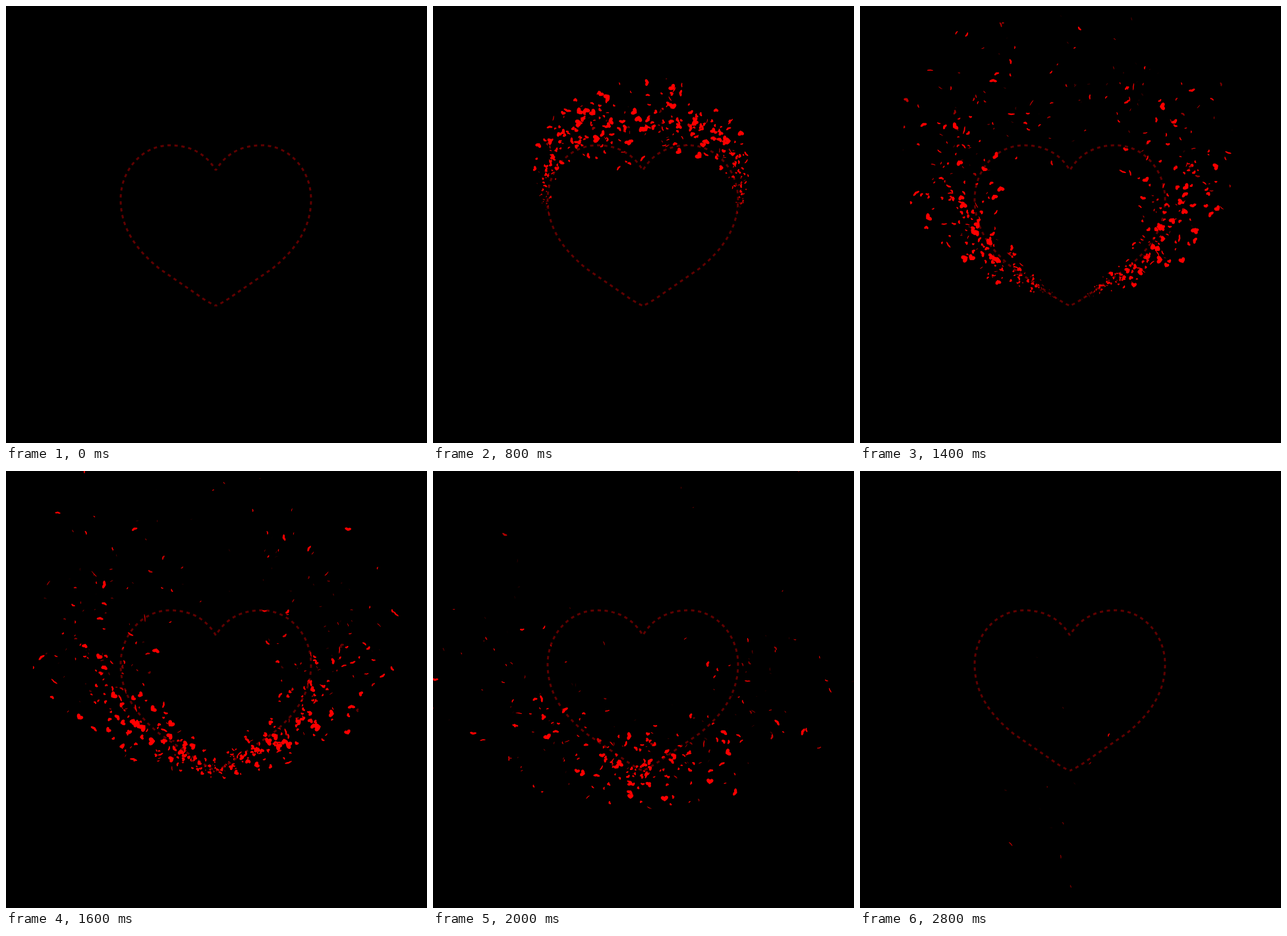
These frames come from a looping animation (639x662 px, 2900 ms). An HTML page with a canvas:

```html
<!DOCTYPE html>
<html lang="en">
<head>
<meta charset="utf-8">
<title>Heart petals</title>
<style>
  html, body { margin: 0; width: 100%; height: 100%; overflow: hidden; background: #000; }
  canvas { display: block; }
</style>
</head>
<body>
<canvas width="639" height="662"></canvas>
<script>
const ctx = document.querySelector('canvas').getContext('2d');
const LOOP = 2900, STEP = 100, EMIT = 1430, COUNT = 680, AXIS = 637;

// Left half of the outline, from the notch to the tip; the right half mirrors it.
const HALF = 'M318.5 249C304 224 280 211 249 211C207.6 211 174 247.7 174 293' +
  'C174 335 196 368 233 398L290 437Q308 450 318.5 454';
const outline = new Path2D(HALF);
const track = document.createElementNS('http://www.w3.org/2000/svg', 'path');
track.setAttribute('d', HALF);
const trackLength = track.getTotalLength();
const dash = trackLength / 41;

const petal = new Path2D('M0-3C-2-7-8-5-6 0C-5 3-2 4 0 6C2 4 5 3 6 0C8-5 2-7 0-3Z');

let seed = 20;
function random() {
  seed = (seed * 1664525 + 1013904223) % 4294967296;
  return seed / 4294967296;
}

const petals = Array.from({ length: COUNT }, (_, i) => {
  const birth = 30 + (i + random()) / COUNT * EMIT;
  const start = track.getPointAtLength((birth - 30) / EMIT * trackLength);
  const x = i % 2 ? AXIS - start.x : start.x;
  const y = start.y;
  const outward = Math.atan2(y - 300, x - AXIS / 2);
  const heading = random() * Math.PI * 2;
  const speed = 0.12 * random();
  return {
    birth, x, y,
    vx: 0.05 * Math.cos(outward) + speed * Math.cos(heading),
    vy: 0.05 * Math.sin(outward) + speed * Math.sin(heading) - 0.035,
    life: 750 + 850 * random() ** 1.2,
    size: 0.3 + 0.65 * random() ** 2,
    angle: random() * Math.PI * 2,
    spin: (random() - 0.5) * 0.006,
    flip: random() * Math.PI,
    flipRate: 0.003 + 0.005 * random()
  };
});

function drawOutline(time) {
  const shift = 5 * dash * time / LOOP;
  ctx.strokeStyle = '#600000';
  ctx.lineWidth = 3;
  ctx.setLineDash([dash * 0.48, dash * 0.52]);
  for (const side of [1, -1]) {
    ctx.setTransform(side, 0, 0, 1, side < 0 ? AXIS : 0, 0);
    ctx.lineDashOffset = side * shift + dash * 0.24;
    ctx.stroke(outline);
  }
}

function drawPetal(p, time) {
  const age = time - p.birth;
  if (age <= 0 || age >= p.life) return;
  const travel = age * (0.75 + age / 4000);
  const grow = Math.min(1, 0.12 + age / 430);
  const fade = Math.min(1, (p.life - age) / 300);
  const thin = 1 - 0.5 * Math.min(1, Math.max(0, age - 600) / 500);
  const flat = 0.15 + 0.85 * Math.abs(Math.cos(p.flip + age * p.flipRate));
  const scale = p.size * grow * (0.4 + 0.6 * fade);
  ctx.setTransform(1, 0, 0, 1, p.x + p.vx * travel, p.y + p.vy * travel);
  ctx.rotate(p.angle + p.spin * age);
  ctx.scale(scale, scale * flat * thin);
  ctx.globalAlpha = Math.min(1, 0.4 + age / 200) * Math.min(1, fade * 1.6);
  ctx.fill(petal);
}

function draw(time) {
  ctx.setTransform(1, 0, 0, 1, 0, 0);
  ctx.globalAlpha = 1;
  ctx.fillStyle = '#000';
  ctx.fillRect(0, 0, 639, 662);
  drawOutline(time);
  ctx.fillStyle = '#f00';
  for (const p of petals) drawPetal(p, time);
}

function frame(now) {
  draw(Math.floor(now % LOOP / STEP) * STEP);
  requestAnimationFrame(frame);
}
frame(performance.now());
</script>
</body>
</html>
```
